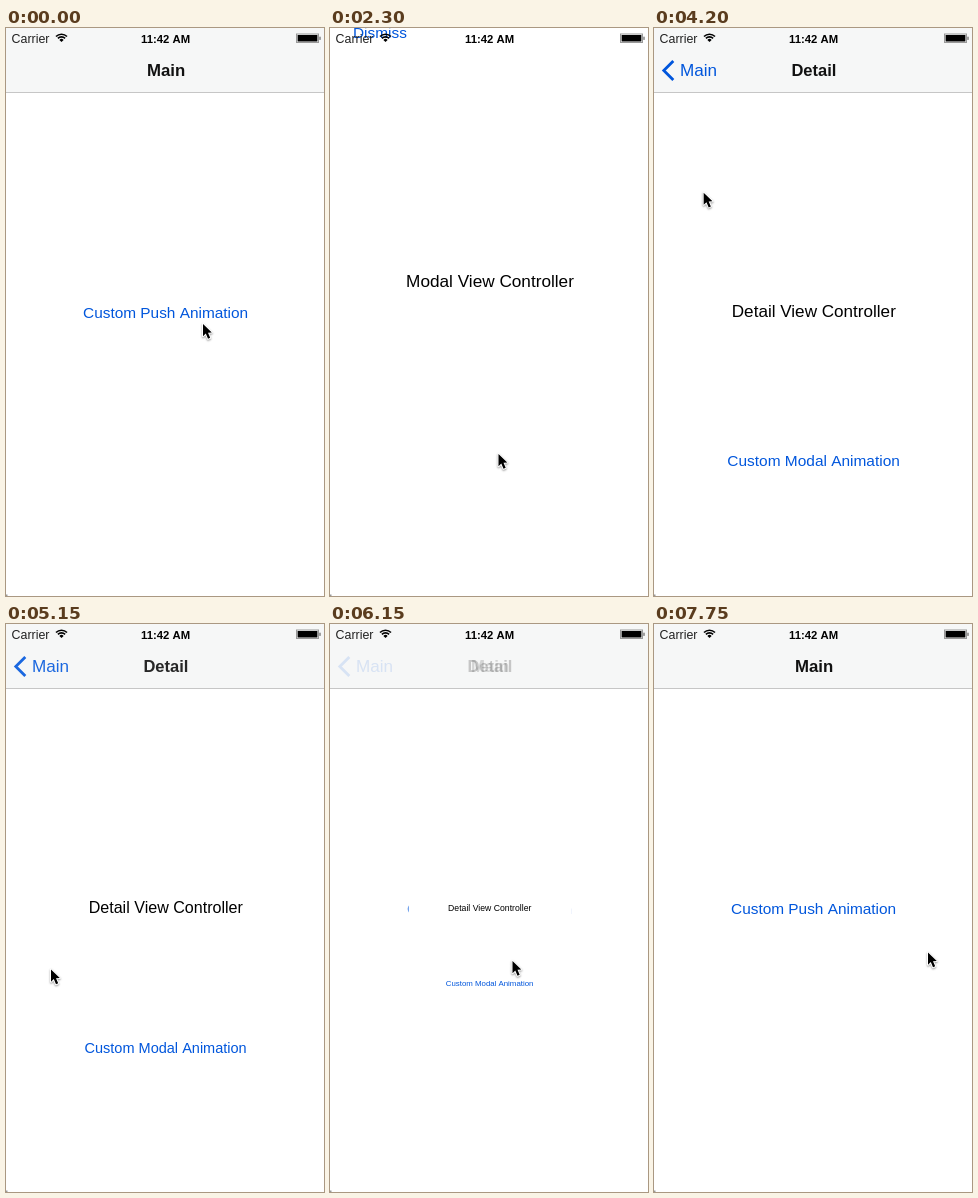
Animation, 318 px wide and 568 px high, one loop 7.8 s. Source, as an HTML page with a canvas:

```html
<!DOCTYPE html>
<html lang="en">
<head>
<meta charset="utf-8">
<title>Custom transitions</title>
<style>
  html, body { margin: 0; width: 100%; height: 100%; overflow: hidden; background: #fff; }
  canvas { display: block; width: 318px; height: 568px; }
</style>
</head>
<body>
<canvas id="stage"></canvas>
<script>
const W = 318, H = 568, MID = 159.6, LOOP = 7800, STEP = 50;
const BLUE = '#0056dc', BAR = '#f6f7f7';
const FONT = '"Liberation Sans", Arial, sans-serif';

const canvas = document.getElementById('stage');
const ctx = canvas.getContext('2d');
const ratio = window.devicePixelRatio || 1;
canvas.width = Math.round(W * ratio);
canvas.height = Math.round(H * ratio);

const clamp = v => Math.max(0, Math.min(1, v));
const smooth = v => v * v * (3 - 2 * v);
const span = (t, a, b) => clamp((t - a) / (b - a));

// Pointer path: time, x, y, eased
const path = [
  [0, 197, 296], [300, 190.5, 280.3, 1], [1200, 190.5, 280.3], [1750, 168.5, 426, 1],
  [2700, 168.5, 426], [3300, 75.5, 41, 1], [3850, 75.5, 41], [4650, 12, 345, 1],
  [4850, 5, 345], [4950, 5, 345], [5150, 45, 345.5], [5750, 104, 341],
  [6150, 182.5, 337], [6550, 265, 337], [6750, 274, 337], [6950, 274, 337],
  [7750, 274, 328.5, 1]
];

function pointer(t) {
  const i = path.findIndex(k => k[0] >= t);
  if (i === 0) return path[0].slice(1, 3);
  if (i < 0) return path[path.length - 1].slice(1, 3);
  const a = path[i - 1], b = path[i];
  let p = span(t, a[0], b[0]);
  if (b[3]) p = smooth(p);
  return [a[1] + (b[1] - a[1]) * p, a[2] + (b[2] - a[2]) * p];
}

// Scale of the detail view; an edge drag drives the way back
function detailScale(t) {
  if (t < 4950) return smooth(span(t, 420, 1060));
  const drag = at => 1 - clamp((pointer(at)[0] - 26) / W);
  return t <= 6550 ? drag(t) : drag(6550) * (1 - span(t, 6550, 6750));
}

// Vertical offset of the modal view: springs in, falls out
function modalOffset(t) {
  if (t < 1950 || t >= 3700) return H;
  if (t < 2700) {
    const s = (t - 1925) / 1000, w = 8.6, decay = 7.98;
    return H * Math.exp(-decay * s) * (Math.cos(w * s) + decay / w * Math.sin(w * s));
  }
  return H * Math.pow(span(t, 3550, 3700), 3);
}

function text(str, x, y, size, { color = '#000', bold = false, align = 'center' } = {}) {
  ctx.font = `${bold ? 'bold ' : ''}${size}px ${FONT}`;
  ctx.textAlign = align;
  ctx.fillStyle = color;
  ctx.fillText(str, x, y);
}

function rect(x, y, w, h, color) {
  ctx.fillStyle = color;
  ctx.fillRect(x, y, w, h);
}

function detailView(s) {
  if (s <= 0.004) return;
  ctx.save();
  ctx.translate(MID, H / 2);
  ctx.scale(s, s);
  ctx.translate(-MID, -H / 2);
  rect(0, 0, W + 2, H, '#fff');
  text('Detail View Controller', MID + 0.2, 289.2, 17.1);
  text('Custom Modal Animation', MID, 437.7, 15.45, { color: BLUE });
  ctx.restore();
}

function navBar(p) {
  rect(0, 0, W, 64, BAR);
  rect(0, 64, W, 1, '#c6c6c6');
  const title = { color: '#111', bold: true };
  ctx.globalAlpha = clamp((p - 0.4) / 0.6);
  text('Main', MID + 0.5, 48.4, 16.8, title);
  ctx.globalAlpha = clamp(1 - 1.6 * p);
  text('Detail', MID + 0.3, 48.4, 16.5, title);
  ctx.globalAlpha = clamp(1 - 1.78 * p);
  text('Main', 26, 48.4, 17.1, { color: BLUE, align: 'left' });
  ctx.strokeStyle = BLUE;
  ctx.lineWidth = 2.8;
  ctx.beginPath();
  ctx.moveTo(19.3, 33);
  ctx.lineTo(9.8, 42.5);
  ctx.lineTo(19.3, 52);
  ctx.stroke();
  ctx.globalAlpha = 1;
}

function modalView(y) {
  if (y >= H) return;
  rect(0, y, W, H, '#fff');
  text('Dismiss', 23, 41 + y, 15.4, { color: BLUE, align: 'left' });
  text('Modal View Controller', MID + 0.4, 289.2 + y, 17.2);
}

function statusBar() {
  text('Carrier', 5.6, 14.6, 12.4, { color: '#222', align: 'left' });
  text('11:42 AM', MID, 14.5, 11.3, { bold: true });

  // Wi-Fi
  const cx = 55.5, cy = 14, a = Math.PI * 0.25;
  ctx.strokeStyle = ctx.fillStyle = '#000';
  ctx.lineWidth = 1.6;
  for (const r of [5.1, 7.8]) {
    ctx.beginPath();
    ctx.arc(cx, cy, r, -Math.PI / 2 - a, -Math.PI / 2 + a);
    ctx.stroke();
  }
  ctx.beginPath();
  ctx.moveTo(cx, cy);
  ctx.arc(cx, cy, 3, -Math.PI / 2 - a, -Math.PI / 2 + a);
  ctx.fill();

  // Battery
  ctx.strokeStyle = '#999';
  ctx.lineWidth = 1;
  ctx.strokeRect(290.5, 6, 22, 8.5);
  rect(291.6, 7, 19.8, 6.5, '#000');
  rect(313.4, 8.7, 1.2, 3.2, '#666');
}

function cursor(x, y) {
  ctx.save();
  ctx.translate(x, y);
  ctx.beginPath();
  for (const [px, py] of [[0, 0], [0, 12.2], [2.8, 9.6], [5, 14.8], [7.2, 13.8], [5, 8.8], [8.8, 8.6]])
    ctx.lineTo(px, py);
  ctx.closePath();
  ctx.lineJoin = 'round';
  ctx.shadowColor = 'rgba(0,0,0,.4)';
  ctx.shadowBlur = 2 * ratio;
  ctx.shadowOffsetY = ratio;
  ctx.strokeStyle = '#fff';
  ctx.lineWidth = 2;
  ctx.stroke();
  ctx.shadowColor = 'transparent';
  ctx.fillStyle = '#000';
  ctx.fill();
  ctx.restore();
}

function draw(t) {
  const s = detailScale(t);
  ctx.setTransform(ratio, 0, 0, ratio, 0, 0);
  rect(0, 0, W, H, '#fff');
  text('Custom Push Animation', MID, 289.7, 15.4, { color: BLUE });
  detailView(s);
  navBar(1 - s);
  modalView(modalOffset(t));
  statusBar();
  rect(0, 566.5, 1.5, 1.5, '#999');
  cursor(...pointer(t));
}

const start = performance.now();
function tick() {
  const t = (performance.now() - start) % LOOP;
  draw(Math.floor(t / STEP) * STEP);
  requestAnimationFrame(tick);
}
tick();
</script>
</body>
</html>
```
